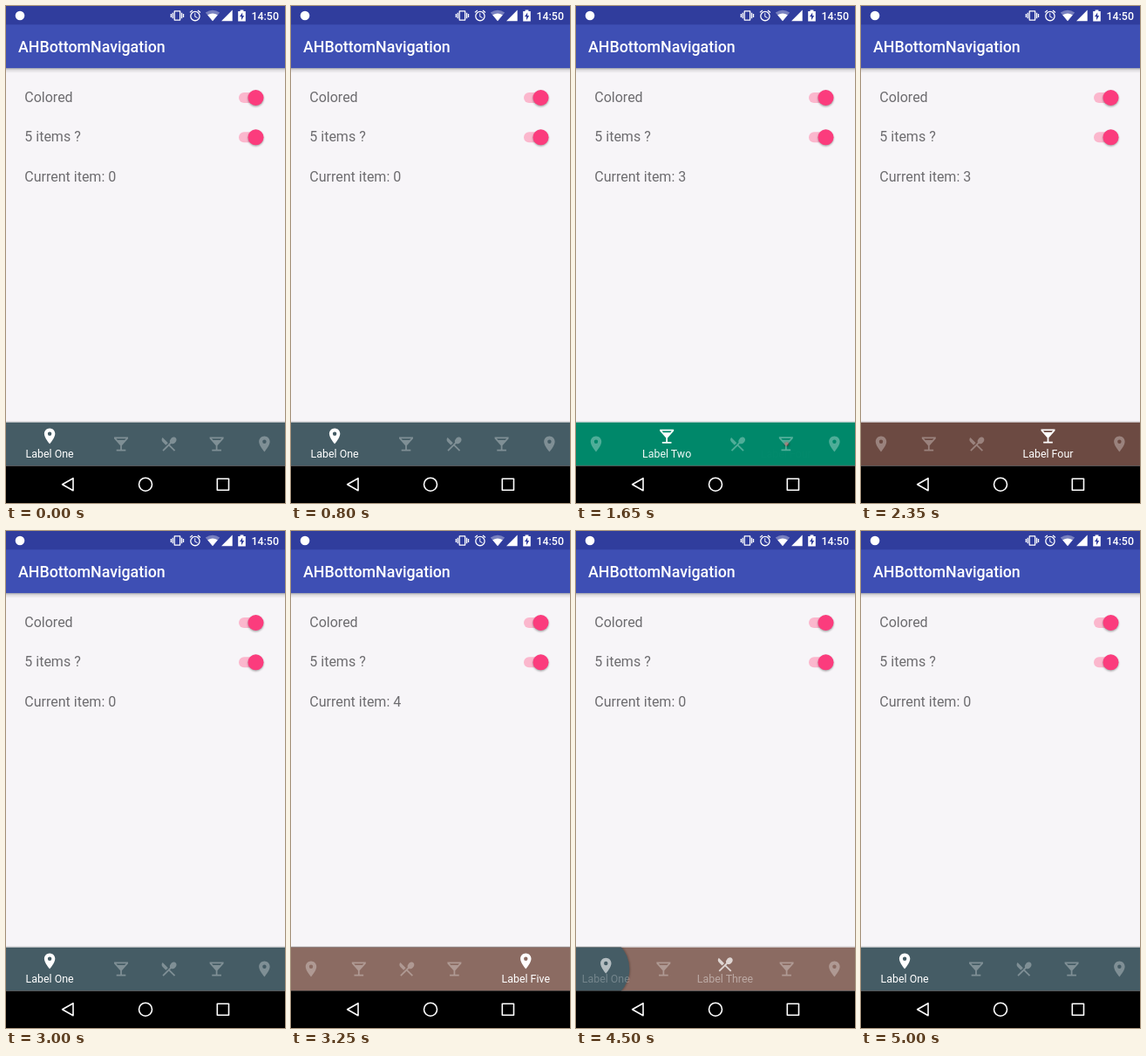
These frames come from a looping animation (320x569 px, 5050 ms). An HTML page:

```html
<!DOCTYPE html>
<html lang="en">
<head>
<meta charset="utf-8">
<title>Bottom navigation</title>
<style>
  html, body { margin: 0; width: 100%; height: 100%; overflow: hidden; background: #f7f5f8; }
  svg { display: block; width: 100%; height: 100%; }
  text { font-family: Roboto, sans-serif; }
  .title { font-size: 17.8px; font-weight: 500; fill: #fff; }
  .clock { font-size: 12.4px; font-weight: 500; fill: #fff; }
  .row { font-size: 16px; fill: #6d6c6f; }
  .label { font-size: 12.4px; fill: #fff; text-anchor: middle; }
</style>
</head>
<body>
<svg viewBox="0 0 320 569" preserveAspectRatio="none">
  <defs>
    <linearGradient id="shade" x2="0" y2="1">
      <stop stop-color="#000" stop-opacity=".3"/>
      <stop offset=".4" stop-color="#000" stop-opacity=".1"/>
      <stop offset="1" stop-color="#000" stop-opacity="0"/>
    </linearGradient>
    <filter id="soft" x="-50%" y="-50%" width="200%" height="200%"><feGaussianBlur stdDeviation="1"/></filter>
    <clipPath id="barClip"><rect y="476.4" width="320" height="50"/></clipPath>
    <path id="pin" d="M12 2C8.13 2 5 5.13 5 9c0 5.25 7 13 7 13s7-7.75 7-13c0-3.87-3.13-7-7-7zm0 9.5a2.5 2.5 0 1 1 0-5 2.5 2.5 0 0 1 0 5z"/>
    <path id="glass" d="M21 5V3H3v2l8 9v5H6v2h12v-2h-5v-5l8-9zM7.43 7L5.66 5h12.69l-1.78 2H7.43z"/>
    <path id="cutlery" d="M8.1 13.34l2.83-2.83L3.91 3.5c-1.56 1.56-1.56 4.09 0 5.66l4.19 4.18zm6.78-1.81c1.53.71 3.68.21 5.27-1.38 1.91-1.91 2.28-4.65.81-6.12-1.46-1.46-4.2-1.1-6.12.81-1.59 1.59-2.09 3.74-1.38 5.27L3.7 19.87l1.41 1.41L12 14.41l6.88 6.88 1.41-1.41L13.41 13l1.47-1.47z"/>
    <g id="switch">
      <rect x="267" y="-6" width="28" height="12" rx="6" fill="#fbb7cd"/>
      <circle cx="286.5" cy="1.2" r="9" fill="#000" opacity=".35" filter="url(#soft)"/>
      <circle cx="286.5" r="9" fill="#fb3c7d"/>
    </g>
  </defs>

  <rect width="320" height="569" fill="#f7f5f8"/>
  <rect y="71" width="320" height="6" fill="url(#shade)"/>
  <rect y="21" width="320" height="50.1" fill="#3e4fb4"/>
  <rect width="320" height="21.3" fill="#303d9d"/>
  <text class="title" x="14" y="53">AHBottomNavigation</text>

  <!-- Status bar -->
  <g fill="#fff">
    <circle cx="16" cy="11" r="5.3"/>
    <path transform="translate(188.7 3.2) scale(.645)" d="M0 15h2V9H0v6zm3 2h2V7H3v10zm19-8v6h2V9h-2zm-3 8h2V7h-2v10zM16.5 3h-9C6.67 3 6 3.67 6 4.5v15c0 .83.67 1.5 1.5 1.5h9c.83 0 1.5-.67 1.5-1.5v-15c0-.83-.67-1.5-1.5-1.5zM16 19H8V5h8v14z"/>
    <path transform="translate(209.2 3.2) scale(.645)" d="M22 5.72l-4.6-3.86-1.29 1.53 4.6 3.86L22 5.72zM7.88 3.39L6.6 1.86 2 5.71l1.29 1.53 4.59-3.85zM12.5 8H11v6l4.75 2.85.75-1.23-4-2.37V8zM12 4a9 9 0 1 0 0 18 9 9 0 0 0 0-18zm0 16a7 7 0 1 1 0-14 7 7 0 0 1 0 14z"/>
    <path d="M237 17.3L228.8 7.4Q237 2 245.2 7.4z" opacity=".35"/>
    <path d="M237 17.3L231.2 10.3Q237 6.8 242.8 10.3z"/>
    <path d="M247 17.2H259.7V4.5z"/>
    <path fill-rule="evenodd" d="M266.2 6H268.6V4.6H272.4V6H274.8V17.5H266.2zM271.2 7.4L267.9 12.3H270V16.2L273.2 11.1H271.2z"/>
    <text class="clock" x="281.5" y="15.5">14:50</text>
  </g>

  <!-- Settings -->
  <g class="row">
    <text x="21.3" y="110">Colored</text>
    <text x="21.3" y="155.3">5 items ?</text>
    <text x="21.3" y="200.6" id="current"></text>
  </g>
  <use href="#switch" y="105"/>
  <use href="#switch" y="150.3"/>

  <!-- Bottom navigation -->
  <rect y="475" width="320" height="2" fill="#000" opacity=".08"/>
  <g clip-path="url(#barClip)">
    <rect id="bar" y="476.4" width="320" height="50"/>
    <circle id="halo" cy="501.5" fill="#000" opacity=".25" filter="url(#soft)"/>
    <circle id="reveal" cy="501.5"/>
    <g id="items"></g>
  </g>

  <!-- System buttons -->
  <rect y="526.4" width="320" height="43" fill="#000"/>
  <g fill="none" stroke="#fff" stroke-width="1.6" stroke-linejoin="round">
    <path d="M64.6 547.7L77 540.7V554.7z"/>
    <circle cx="160" cy="547.7" r="7.5"/>
    <rect x="242.3" y="541.2" width="13.2" height="13"/>
  </g>
</svg>

<script>
const LOOP = 5050, RESIZE_MS = 150, REVEAL_MS = 300, REVEAL_RADIUS = 324;
const NARROW = 54.8, WIDE = 109, LEFT = -4.4;
const DIM = 0.31;

const tabs = [
  { name: 'One', icon: 'pin', color: '#455c65' },
  { name: 'Two', icon: 'glass', color: '#00886a' },
  { name: 'Three', icon: 'cutlery', color: '#8b6b62' },
  { name: 'Four', icon: 'glass', color: '#6c4a42' },
  { name: 'Five', icon: 'pin', color: '#8b6b62' },
];
const taps = [
  { at: -1000, tab: 0 },
  { at: 836, tab: 1 },
  { at: 1635, tab: 3 },
  { at: 2380, tab: 0 },
  { at: 3002, tab: 4 },
  { at: 3685, tab: 2 },
  { at: 4434, tab: 0 },
];

const byId = id => document.getElementById(id);
const set = (el, attrs) => {
  for (const key in attrs) el.setAttribute(key, attrs[key]);
  return el;
};
const add = (parent, tag, attrs) =>
  parent.appendChild(set(document.createElementNS('http://www.w3.org/2000/svg', tag), attrs));
const ease = t => 0.5 - Math.cos(Math.PI * Math.min(1, Math.max(0, t))) / 2;
const mix = (a, b, t) => a + (b - a) * t;

for (const tab of tabs) {
  tab.iconEl = add(byId('items'), 'use', { href: '#' + tab.icon, fill: '#fff' });
  tab.labelEl = add(byId('items'), 'text', { class: 'label', y: 516.6 });
  tab.labelEl.textContent = 'Label ' + tab.name;
}

// Centre of a tab while it is still narrow and another tab is wide.
const restingCentre = (tab, active) =>
  LEFT + NARROW * (tab + 0.5) + (tab > active ? WIDE - NARROW : 0);

function draw(time) {
  const index = taps.findLastIndex(tap => tap.at <= time);
  const { at, tab: active } = taps[index];
  const previous = taps[Math.max(0, index - 1)].tab;
  const progress = ease((time - at) / RESIZE_MS);
  const revealing = time - at < REVEAL_MS;
  const r = revealing ? REVEAL_RADIUS * ease((time - at) / REVEAL_MS) : 0;
  const cx = restingCentre(active, previous);

  byId('current').textContent = 'Current item: ' + active;
  set(byId('bar'), { fill: tabs[revealing ? previous : active].color });
  set(byId('reveal'), { cx, r, fill: tabs[active].color });
  set(byId('halo'), { cx, r: r && r + 1 });

  let x = LEFT;
  tabs.forEach((tab, i) => {
    const focus = i === active ? (active === previous ? 1 : progress)
      : i === previous ? 1 - progress : 0;
    const width = mix(NARROW, WIDE, focus);
    const centre = x + width / 2;
    const tint = mix(DIM, 1, focus);
    const iconY = mix(501.5, 492.5, focus);
    set(tab.iconEl, {
      transform: `translate(${centre - 10.67} ${iconY - 10.67}) scale(.889)`,
      opacity: tint,
    });
    set(tab.labelEl, { x: centre, opacity: focus * tint });
    x += width;
  });
}

function tick() {
  draw(performance.now() % LOOP);
  requestAnimationFrame(tick);
}
tick();
</script>
</body>
</html>
```
